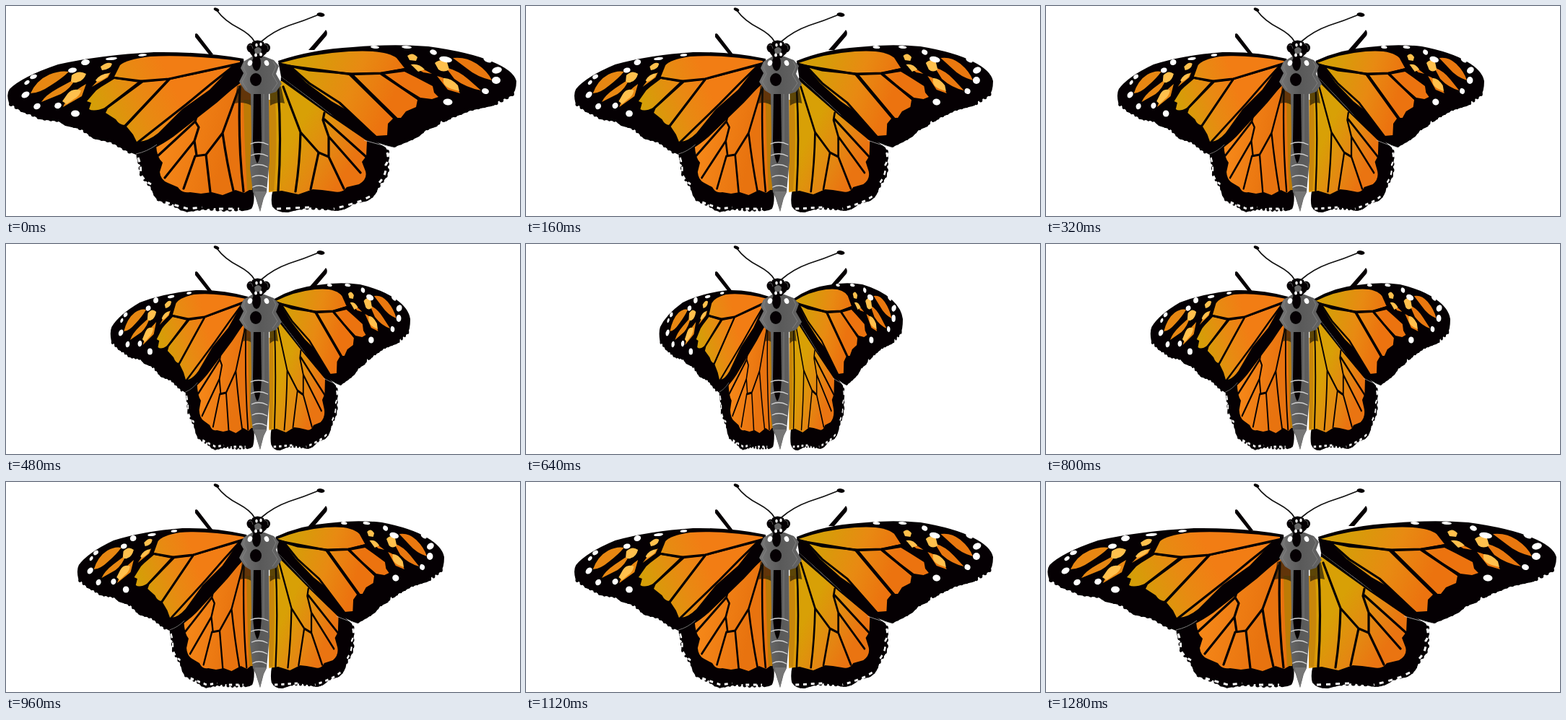
An HTML page for the animation above (2880 ms loop, 712 px wide and 291 px high).

```html
<!DOCTYPE html>
<html lang="en">
<head>
<meta charset="utf-8">
<title>Butterfly</title>
<style>
html, body { margin: 0; width: 100%; height: 100%; overflow: hidden; background: #fff; }
svg { display: block; width: 100%; height: 100%; }
.vein { fill: none; stroke: #050003; stroke-width: 3.2; stroke-linejoin: round; stroke-linecap: round; }
.scallop { fill: none; stroke: #050003; stroke-width: 6; stroke-linecap: round; stroke-dasharray: 0 8.5; }
.fringe { fill: none; stroke: #fff; stroke-width: 3; stroke-dasharray: 6 7; }
.white { fill: #fff; }
.pale { fill: #ffc04d; }
.rib { fill: none; stroke: #d4d4d4; stroke-width: 1.3; stroke-linecap: round; }
.feeler { fill: none; stroke: #111; stroke-width: 1.8; stroke-linecap: round; }
</style>
</head>
<body>
<svg viewBox="0 0 712 291" fill="#050003">
  <defs>
    <linearGradient id="foreL" gradientUnits="userSpaceOnUse" x1="125" y1="140" x2="225" y2="95">
      <stop stop-color="#d59e08"/><stop offset=".55" stop-color="#e88a12"/><stop offset="1" stop-color="#f27d14"/>
    </linearGradient>
    <linearGradient id="foreR" gradientUnits="userSpaceOnUse" x1="415" y1="80" x2="535" y2="130">
      <stop stop-color="#d59e08"/><stop offset=".55" stop-color="#e88a12"/><stop offset="1" stop-color="#ec730f"/>
    </linearGradient>
    <linearGradient id="hindL" gradientUnits="userSpaceOnUse" x1="220" y1="190" x2="300" y2="210">
      <stop stop-color="#f58718"/><stop offset="1" stop-color="#e8730f"/>
    </linearGradient>
    <linearGradient id="hindR" gradientUnits="userSpaceOnUse" x1="400" y1="175" x2="475" y2="222">
      <stop stop-color="#d8a006"/><stop offset=".6" stop-color="#e48712"/><stop offset="1" stop-color="#ea7411"/>
    </linearGradient>
    <linearGradient id="bodyFill">
      <stop stop-color="#757575"/><stop offset=".5" stop-color="#5a5a5a"/><stop offset="1" stop-color="#646464"/>
    </linearGradient>
  </defs>

  <path d="M262 39Q264 36 267 41L287 67H281L262 43ZM443 33Q446 36 444 41L427 61H419L440 37Z"/>

  <g id="left">
    <path d="M331 98L260 152 181 204Q179 210 186 221Q182 232 192 241Q200 247 203 258Q206 269 218 272L232 275Q240 285 254 285L272 282 290 280Q303 287 317 280Q328 287 340 281Q345 273 343 256Z"/>
    <path class="scallop" d="M184 208L188 234 203 252 210 267 236 277 248 283 275 280 300 282 335 281"/>
    <path class="fringe" d="M183 210Q188 224 186 231Q190 242 201 247M221 272L238 277 252 281 272 279M295 281L323 281"/>
    <path fill="url(#hindL)" d="M330 103L265 151 208 194Q209 210 217 217L213 230Q214 241 224 245L238 251Q244 260 255 258L270 260 285 258 300 262 318 255 330 259 342 252 340 103Z"/>
    <path fill="#bd7b06" d="M329 130H341V255H334Q330 190 329 130Z"/>
    <path class="vein" d="M324 112Q321 190 329 257M322 116L300 176Q306 218 315 256M300 176L277 206 283 258M277 206L262 208 246 253M265 150L262 160 267 168 261 187 264 207M262 160L211 207M261 187L220 238"/>
    <path fill="#1a1408" opacity=".65" d="M320 111Q333 105 340 111V138Q329 132 317 135Z"/>

    <path d="M329 73Q270 63 205 64Q130 68 72 81Q22 98 5 115Q0 122 4 134L13 140 22 147 36 151 47 157 73 160 82 166 105 171 121 184 146 189 165 200 180 206Q202 202 232 181L292 134 332 99Z"/>
    <path class="scallop" d="M7 136L20 143 48 155 73 158 103 169 122 181 148 188 172 202"/>
    <path d="M180 205Q195 202 209 192" fill="none" stroke="#999" stroke-width=".8"/>
    <g fill="url(#foreL)">
      <path d="M324 76Q250 67 200 70Q167 74 158 82L150 98 187 104 225 101 324 80Z"/>
      <path d="M150 101L185 106 137 141Q122 147 115 143L118 134 112 132 125 117 132 112Z"/>
      <path d="M190 106L223 103 165 165Q157 165 152 157L138 148 141 142Z"/>
      <path d="M228 102L313 84 282 116 244 143 211 176Q195 189 181 188L176 178 167 167Z"/>
    </g>
    <path class="vein" d="M326 79L226 101 187 104 147 99M187 104L134 145M226 101L163 168M313 85L284 108 250 136 180 191"/>
    <path fill="#e78712" d="M34 121Q42 103 60 95Q75 89 87 91Q78 100 62 110Q46 121 34 121ZM49 133Q54 124 72 114L96 101Q90 114 76 122ZM79 140Q86 122 111 108L105 125ZM119 112L132 98 145 92 141 99Z"/>
    <path class="pale" d="M91 96Q101 88 111 94Q108 103 100 105Q94 108 90 104ZM78 132L85 122Q92 113 104 117Q102 125 94 129L84 136ZM131 84Q141 76 147 80Q145 88 133 89ZM124 103Q130 94 143 93Q140 101 126 105Z"/>
    <g id="spotsL" class="white"></g>
  </g>

  <g id="right">
    <path d="M381 98L450 150 526 196Q534 210 528 219Q532 231 525 240Q516 247 514 257Q509 267 498 271L483 273Q471 284 456 284L439 281 423 279Q405 282 391 286Q376 287 369 278Q366 268 370 254Z"/>
    <path class="scallop" d="M528 202L528 232 513 253 504 266 478 273 464 281 438 280 414 279 380 283"/>
    <path class="fringe" d="M528 203Q531 214 526 220Q528 234 515 247M504 264L492 270 470 277 454 281M420 279L375 281"/>
    <path fill="url(#hindR)" d="M382 104L446 150 500 187 499 208 493 216 498 229Q501 240 489 247L472 251Q466 260 453 257L438 255 425 254 405 261 382 256 364 258 366 104Z"/>
    <path fill="#c8860a" d="M364 130H373Q377 195 371 256H364Z"/>
    <path class="vein" d="M377 113Q382 185 377 256M384 112L408 175Q407 218 401 257M408 175L433 203 422 254M433 203L447 209 468 253M441 148L439 158 447 181 447 209M441 157L500 210M447 181L491 231"/>
    <path fill="#1a1408" opacity=".65" d="M365 111Q376 106 381 112L386 135Q376 132 366 138Z"/>

    <path d="M377 76Q425 60 480 57Q535 52 585 56Q643 64 673 77Q703 89 707 104Q707 120 699 125L682 132 676 138 643 145 629 151 617 155 610 160 603 159 597 167 582 172 572 181 557 188 537 196Q514 191 480 173L428 133 381 98Z"/>
    <path class="scallop" d="M701 122L680 134 642 143 608 157 582 170 562 183 538 193"/>
    <path d="M496 186Q515 192 537 196" fill="none" stroke="#bbb" stroke-width=".8"/>
    <g fill="url(#foreR)">
      <path d="M380 79Q425 66 475 63Q525 60 541 72L552 86 520 92 478 93 381 80Z"/>
      <path d="M552 91L568 99 591 111 593 120 599 126 590 129 574 127 522 95Z"/>
      <path d="M482 96L518 95 570 130 568 140 554 146 547 155 539 155Z"/>
      <path d="M393 84L475 96 536 156 529 163 528 179 512 180 472 144 451 132 417 107Z"/>
    </g>
    <path class="vein" d="M379 80L420 89 478 94 520 93 556 87M520 93L574 131M478 94L544 159M395 85L420 107 462 134 513 182"/>
    <path fill="#e9780f" d="M619 72Q637 70 652 80Q668 91 673 103Q652 98 639 87ZM609 85Q628 90 641 102L658 117Q637 113 621 101ZM597 97Q620 102 629 121L612 116ZM560 81Q575 85 590 94L578 92Z"/>
    <path class="pale" d="M594 79Q602 72 611 78L614 88Q606 93 599 88ZM606 100Q616 99 626 110L628 118 617 115Q608 112 606 106ZM556 69Q563 63 570 71L568 76 559 75ZM561 81Q572 79 580 88L571 91Z"/>
    <g id="spotsR" class="white"></g>
  </g>

  <path class="feeler" d="M344 49Q338 39 323 31Q303 21 292 6M354 49Q370 35 392 27Q414 20 433 12"/>
  <ellipse cx="291.500" cy="5" rx="4" ry="2.200" transform="rotate(25 291.500 5)"/>
  <ellipse cx="436" cy="12" rx="5.500" ry="2.800" transform="rotate(8 436 12)"/>
  <path fill="url(#bodyFill)" d="M341 70L329 77 325 86 329 93 323 105 331 117 339 122 340 180 338 225 342 258 346 266 352 285 357 266 361 258 365 215 364 122 374 119 382 108 374 94 378 83 371 75 358 70Z"/>
  <path fill="none" stroke="#858585" stroke-width=".8" d="M331 78L329 86 333 94 327 105 334 116M370 77L374 84 369 95 376 107 369 117M357 122V190"/>
  <path fill="#777" d="M344 257H361L356 268 352 285 346 266Z"/>
  <path d="M343 122H353L354 185Q353 213 348 218Q343 210 342 185Z"/>
  <ellipse cx="347" cy="79" rx="6" ry="11"/>
  <ellipse cx="346" cy="102" rx="8" ry="9"/>
  <path d="M341 50Q348 45 357 50L361 65 354 72H343L338 65Z"/>
  <ellipse cx="339" cy="58" rx="5.500" ry="6.500"/>
  <ellipse cx="360" cy="58" rx="6" ry="6.500"/>
  <path fill="none" stroke="#555" stroke-width="1" d="M336 55Q340 51 342 59M358 53Q363 53 363 60"/>
  <path fill="#666" d="M344 60Q349 54 354 60L353 66H345Z"/>
  <g id="spotsBody" class="white"></g>
  <g id="ribs"></g>
</svg>
<script>
const STEP = 160, LOOP = 2880;
const TIPS = { left: [1, 66, 98, 144, 184], right: [707, 647, 607, 560, 522] };
const HINGE = { left: 344, right: 365 };
const el = id => document.getElementById(id);

// each spot: x, y, rx, ry, tilt
function dots(id, list) {
  el(id).innerHTML = list.map(([x, y, rx, ry, a = 0]) =>
    `<ellipse cx="${x}" cy="${y}" rx="${rx}" ry="${ry}" transform="rotate(${a} ${x} ${y})"/>`).join("");
}

dots("spotsL", [
  [38, 98, 5, 3, -20], [29, 106, 4, 2.5, -35], [27, 123, 6, 4, -30], [43, 139, 5, 4, -30],
  [72, 138, 5, 4, -25], [96, 149, 6, 4.5], [92, 89, 6, 3.5, -10], [110, 78, 6, 4, -10],
  [146, 73, 8, 2, -5], [189, 68, 6, 1.7, -5]
]);
dots("spotsR", [
  [511, 57, 6, 2, 5], [555, 57, 7, 2, 5], [592, 64, 5, 3.5, 20], [609, 74, 9, 4, 10],
  [667, 75, 6, 2.8, 25], [680, 89, 7, 4.5, -15], [679, 103, 6, 5], [664, 118, 5, 4, 15],
  [612, 133, 6.5, 4.5, 5]
]);
dots("spotsBody", [
  [347, 54, 1.7, 2.5], [353, 53, 1.7, 2.5], [346, 68, 2, 2.5], [353, 67, 2, 2.5],
  [338, 79, 3.2, 4, 20], [361, 79, 3.2, 4, -20]
]);
el("ribs").innerHTML = [191, 207, 222, 237, 251].map((y, i) =>
  `<path class="rib" d="M${339 + i * .7} ${y}Q351 ${y - 5} ${363 - i * .5} ${y + 1}"/>`).join("");

function setWing(side, pose) {
  const tips = TIPS[side], h = HINGE[side];
  const s = (tips[pose] - h) / (tips[0] - h);
  el(side).setAttribute("transform", `matrix(${s} 0 0 1 ${h * (1 - s)} 0)`);
}

function draw(t) {
  const i = Math.floor((t % LOOP) / STEP);
  const pose = Math.max(0, Math.min(i, 8 - i));
  setWing("left", pose);
  setWing("right", pose);
}

const start = performance.now();
function tick() {
  draw(performance.now() - start);
  requestAnimationFrame(tick);
}
tick();
</script>
</body>
</html>
```
